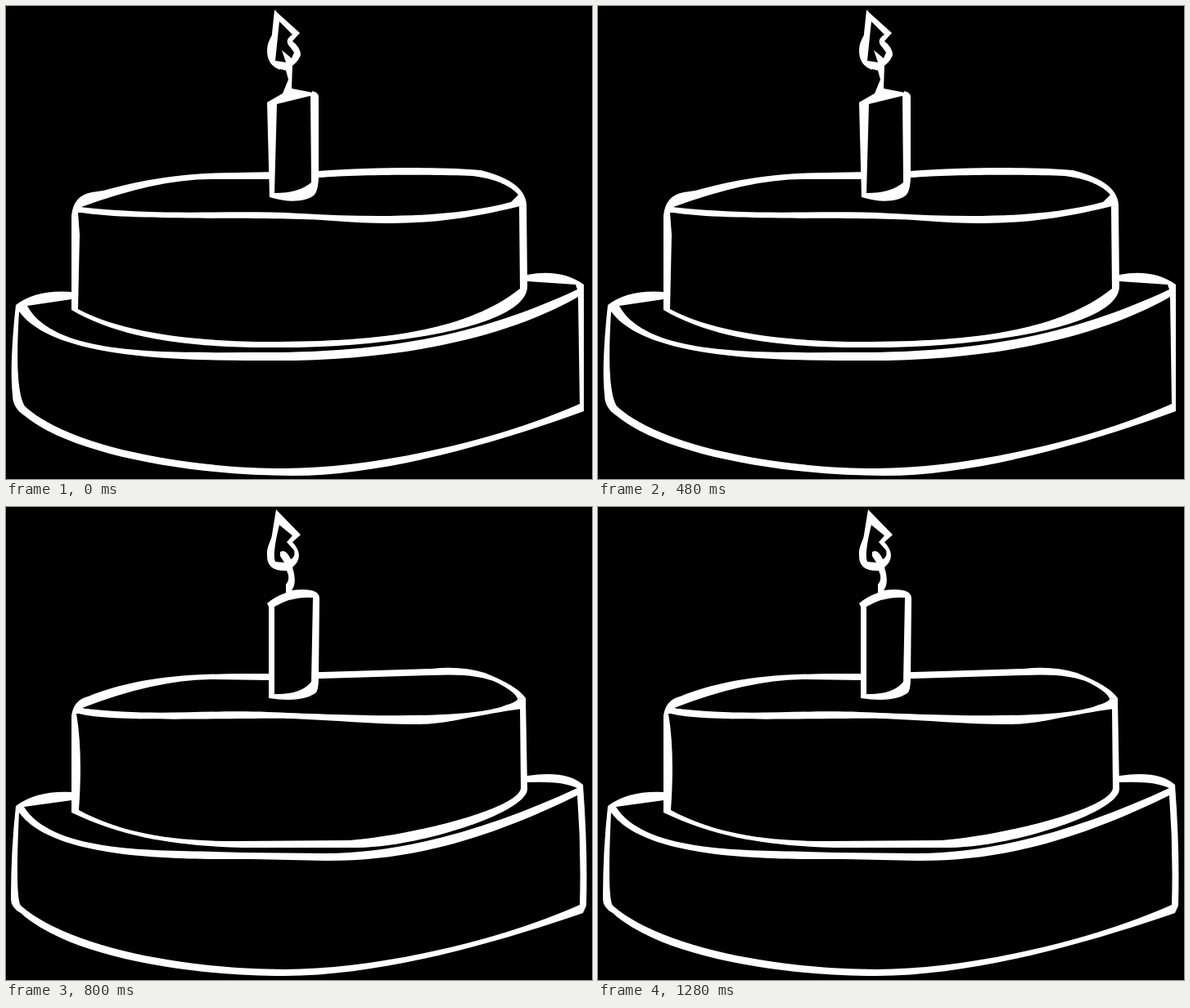
An HTML page that plays this animation: 716x579 px, repeating every 1400 ms.

```html
<!DOCTYPE html>
<html lang="en">
<head>
<meta charset="utf-8">
<title>Birthday cake</title>
<style>
  html, body { margin: 0; width: 100%; height: 100%; overflow: hidden; background: #000; }
  svg { display: block; width: 100%; height: 100%; }
  .ink { fill: #fff; }
  .gap { fill: #000; }
  .pose { visibility: hidden; animation: 1400ms step-end infinite; }
  #first { animation-name: first; }
  #second { animation-name: second; }
  #third { animation-name: third; }

  /* three poses in turn, 160 ms each; the last one is cut at 1400 ms */
  @keyframes first {
    0%, 34.285%, 68.571% { visibility: visible; }
    11.428%, 45.714%, 80%, 100% { visibility: hidden; }
  }
  @keyframes second {
    0%, 22.857%, 57.142%, 91.428%, 100% { visibility: hidden; }
    11.428%, 45.714%, 80% { visibility: visible; }
  }
  @keyframes third {
    0%, 34.285%, 68.571% { visibility: hidden; }
    22.857%, 57.142%, 91.428%, 100% { visibility: visible; }
  }
</style>
</head>
<body>
<svg viewBox="0 0 716 579">
  <defs>
    <!-- parts shared by the two angular poses -->
    <g id="tiers">
      <path class="ink" d="M12 366Q37 347 80 350L637 329Q678 321 706 341V496C600 535 460 575 350 575C230 575 80 550 22 501Q8 492 8 476Q4 440 12 366Z"/>
      <path class="gap" d="M16 374C60 434 220 434 330 434C480 434 610 407 699 356L701 487C600 532 450 566 340 566C230 566 80 542 23 490Q10 470 16 374Z"/>
      <path class="gap" d="M26 367L80 359L637 337L696 341L698 347C600 393 490 424 320 424C200 424 60 430 26 367Z"/>
      <path class="ink" d="M80 372V257L636 245L637 343C637 396 450 420 320 418C230 418 140 408 80 372Z"/>
      <path class="gap" d="M88 253L90 280L88 371C150 405 260 411 320 411C450 411 560 400 628 346L627 245Z"/>
      <path class="gap" d="M92 246Q185 212 250 212H320L382 210C430 206 530 206 570 208Q610 213 626 231L617 240L600 262H120Z"/>
    </g>
    <g id="candle">
      <path class="ink" d="M328 5L359 33L350 43Q360 51 360 60Q357 68 350 73L349 101L380 107L382 211Q381 228 376 232C365 240 345 241 322 234L319 118L338 107L345 90L342 79Q321 75 321 58C321 47 325 40 325 34Z"/>
      <path class="gap" d="M331 120L372 110L373 216Q358 229 328 229Z"/>
      <path class="gap" d="M334 19L350 35Q339 42 347 50L352 57L349 64L337 54L342 69L329 67Z"/>
    </g>
  </defs>

  <g id="first" class="pose">
    <path class="ink" d="M80 257Q82 232 105 228Q118 227 130 223Q200 204 280 204L382 202C450 197 540 197 580 201Q636 215 636 245Z"/>
    <use href="#tiers"/>
    <path class="ink" d="M90 246C200 258 270 249 360 254S540 260 617 240L628 245C540 267 480 269 400 263S150 264 87 252Z"/>
    <path class="ink" d="M374 104Q382 106 382 111V211L374 225Z"/>
    <path class="ink" d="M330 3L326 34Q319 45 319 54Q319 73 335 78Z"/>
    <use href="#candle"/>
  </g>

  <g id="second" class="pose">
    <path class="ink" d="M80 257Q92 226 115 224Q130 224 140 221Q205 204 280 204L382 202C450 197 530 197 604 208Q630 214 635 245Z"/>
    <use href="#tiers"/>
    <path class="ink" d="M90 246C200 254 290 254 370 255S540 256 617 240L628 245C560 264 500 266 440 264S150 266 87 252Z"/>
    <use href="#candle"/>
  </g>

  <g id="third" class="pose">
    <path class="ink" d="M80 255Q83 236 100 232C170 204 240 204 320 204L520 198Q555 194 585 203Q625 219 635 234Z"/>
    <path class="ink" d="M12 366Q37 347 80 349L637 329Q685 322 705 340Q711 420 709 488L705 497C600 533 460 574 340 574C230 574 80 553 18 497Q5 490 6 478Q6 420 12 366Z"/>
    <path class="gap" d="M16 374C60 434 220 431 300 431L390 433C510 434 610 396 698 353Q703 420 701 487C600 532 450 566 340 566C230 566 80 542 18 488Q11 478 16 374Z"/>
    <path class="gap" d="M22 367L80 359L637 337Q680 335 698 344C600 390 490 424 390 424L290 423C200 419 60 428 22 367Z"/>
    <path class="ink" d="M80 374V255L635 234L637 345C637 375 500 417 430 417H290C220 415 150 408 80 374Z"/>
    <path class="gap" d="M86 253Q94 300 89 371C150 404 220 409 280 409L420 408C490 403 627 370 629 344L628 243Z"/>
    <path class="gap" d="M93 246Q180 212 250 211L320 212L520 206Q575 203 600 215Q625 228 625 236Q618 242 600 245L580 255H120Z"/>
    <path class="ink" d="M90 246C180 257 240 248 320 251S560 262 610 243L630 239V247C560 257 540 266 500 266C450 266 400 261 350 259S120 265 87 252Z"/>
    <path class="ink" d="M330 3L360 34L350 43Q366 60 350 74Q356 93 349 102Q383 98 383 112L382 209Q382 225 378 228Q360 240 321 234V122L319 118Q328 110 342 105V95Q348 88 343 78Q319 79 319 60C318 48 324 42 325 34Z"/>
    <path class="gap" d="M328 122Q350 109 375 111L373 214Q360 230 328 229Z"/>
    <path class="gap" d="M334 22L350 35L343 43L352 53Q354 61 348 64Q342 51 335 55V60L340 68L329 67Q325 58 334 22Z"/>
  </g>
</svg>
</body>
</html>
```
